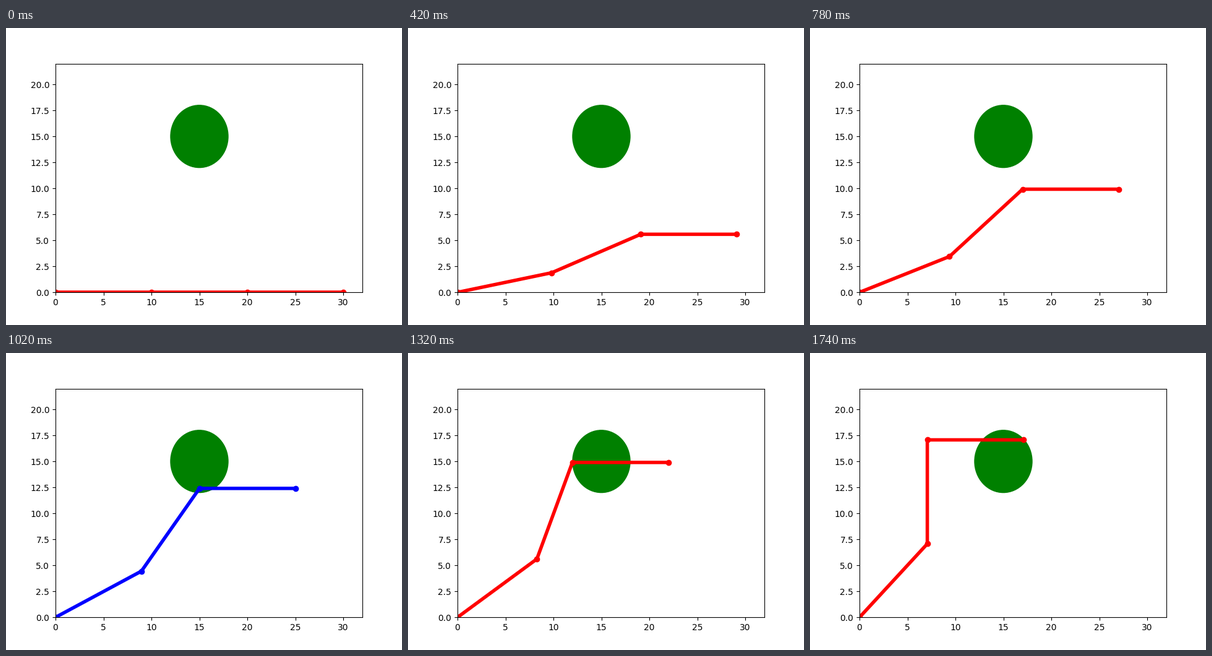
A matplotlib script for the animation above (1.8 s loop, 640 px wide and 480 px high).

```python
import matplotlib.pyplot as plt
import numpy as np
from matplotlib.animation import FuncAnimation

FRAMES = 30
INTERVAL = 60
LINK = 10
CENTER = np.array([15, 15])
RADIUS = 3

angles = np.linspace(0, np.pi / 4, FRAMES)

fig, ax = plt.subplots(figsize=(6.4, 4.8), dpi=100)
ax.set_xlim(0, 32)
ax.set_ylim(0, 22)
ax.add_patch(plt.Circle(CENTER, RADIUS, color="green"))
arm, = ax.plot([], [], "o-", color="red", linewidth=4)


def joints(angle):
    """Joint positions; the last link always stays horizontal."""
    headings = np.array([angle, 2 * angle, 0])
    steps = LINK * np.column_stack([np.cos(headings), np.sin(headings)])
    return np.vstack([[0, 0], np.cumsum(steps, axis=0)])


def update(i):
    points = joints(angles[i])
    # Only the inner joints count as hits, not the tip.
    gaps = np.linalg.norm(points[:-1] - CENTER, axis=1)
    arm.set_data(points[:, 0], points[:, 1])
    arm.set_color("blue" if gaps.min() < RADIUS else "red")
    return arm,


anim = FuncAnimation(fig, update, frames=FRAMES, interval=INTERVAL,
                     repeat=True, repeat_delay=0)
plt.show()
```
